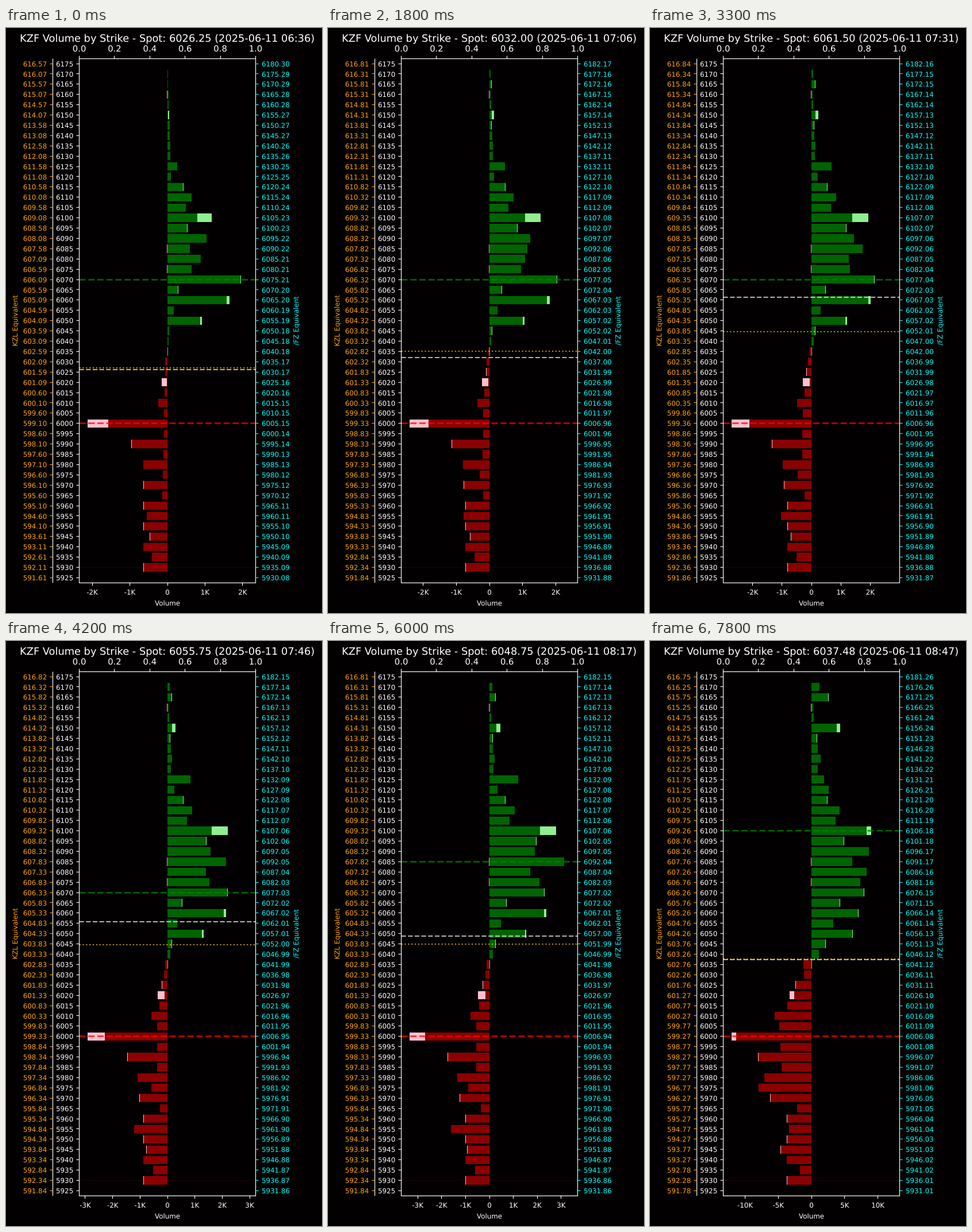
An HTML page that plays this animation: 550 by 1019 pixels, repeating every 8 s.

```html
<!DOCTYPE html>
<html lang="en">
<head>
<meta charset="utf-8">
<title>Volume by Strike</title>
<style>
  html, body { margin: 0; width: 550px; height: 1019px; overflow: hidden; background: #030001; }
  svg { display: block; font: 11.85px "DejaVu Sans", sans-serif; text-rendering: geometricPrecision; }
</style>
</head>
<body>
<svg id="chart" width="550" height="1019" viewBox="0 0 550 1019"></svg>
<script>
const STEP_MS = 300, LOOP_MS = 8000, OPENING_STEP = 22, LAST_STEP = 26;
const LEFT = 127.6, WIDTH = 306.8, RIGHT = LEFT + WIDTH, ZERO = LEFT + WIDTH / 2;
const TOP = 53.5, BOTTOM = 966.5, LONGEST = 139.5;
const HIGH = 6175, LOW = 5925, GAP = 5, PITCH = 17.908;
const ORANGE = '#ffa500', CYAN = '#0ff', WHITE = '#fff';
const chart = document.getElementById('chart');

const mix = (a, b, k) => a + (b - a) * k;
const clamp = v => Math.min(1, Math.max(0, v));
const snap = v => Math.floor(v) + .5;
const rowY = price => 62 + (HIGH - price) / GAP * PITCH;
const noise = n => { const v = Math.sin(n * 12.9898) * 43758.5453; return v - Math.floor(v); };

// Piecewise linear curve through [x, y] points, flat beyond both ends.
function curve(...points) {
  points.sort((a, b) => a[0] - b[0]);
  return x => {
    const i = points.findIndex(p => p[0] >= x);
    if (i < 1) return (i ? points[points.length - 1] : points[0])[1];
    const [x1, y1] = points[i - 1], [x2, y2] = points[i];
    return mix(y1, y2, (x - x1) / (x2 - x1));
  };
}

// Strikes ending in 0 and in 5 follow separate curves, early and late in the session.
const early = {
  tens: curve([6170, 1], [6120, 6], [6100, 77], [6080, 58], [6070, 128], [6060, 108], [6050, 60], [6040, 2],
    [6010, -16], [6000, -LONGEST], [5990, -63], [5980, -42]),
  fives: curve([6165, 1], [6135, 5], [6115, 28], [6075, 42], [6065, 19], [6045, 3], [6025, -4], [5965, -9],
    [5955, -36], [5935, -27])
};
const late = {
  tens: curve([6170, 14], [6160, 3], [6150, 50], [6140, 11], [6130, 11], [6110, 49], [6100, 104], [6070, 92],
    [6050, 72], [6040, 13], [6010, -64], [6000, -LONGEST], [5990, -93], [5970, -72], [5960, -43]),
  fives: curve([6165, 30], [6155, 4], [6115, 28], [6075, 85], [6065, 50], [6045, 25], [6035, -14], [6005, -56],
    [5985, -52], [5975, -92], [5965, -25], [5945, -54], [5935, -20])
};
// Strikes that swell before the opening and fall back after it.
const surges = { 6125: 32, 6100: 30, 6095: 40, 6085: 80, 6075: 30, 6070: -20, 5955: -30 };
const tipShares = { 6150: .5, 6100: .33, 6060: .05, 6050: .05, 6020: .9, 6000: .26 };

const spotAt = curve([0, 6026.25], [3, 6027.75], [6, 6032], [11, 6061.5], [17, 6050], [20, 6048.75], [26, 6037.48]);
const markAt = curve([0, 6027], [3, 6026.9], [6, 6035.2], [11, 6044.5], [20, 6045], [26, 6037.5]);
const fundAt = curve([0, 616.571], [3, 616.6847], [6, 616.8086], [11, 616.8371], [17, 616.7931], [20, 616.8119],
  [26, 616.7461]);
const futureAt = curve([0, 6180.296], [3, 6181.081], [6, 6182.167], [11, 6182.1605], [17, 6182.139], [20, 6182.145],
  [26, 6181.261]);

const text = (x, y, str, anchor = 'middle', fill = WHITE, extra = '') =>
  `<text x="${x}" y="${y}" text-anchor="${anchor}" fill="${fill}" ${extra}>${str}</text>`;
const line = (x1, y1, x2, y2, stroke = WHITE, width = 1.2, extra = '') =>
  `<line x1="${x1}" y1="${y1}" x2="${x2}" y2="${y2}" stroke="${stroke}" stroke-width="${width}" ${extra}/>`;
const sideLabel = (x, str, fill) => text(0, 0, str, 'middle', fill, `transform="translate(${x} 510) rotate(-90)"`);

function barsAt(step) {
  const before = clamp(step / OPENING_STEP);
  const after = clamp((step - OPENING_STEP) / (LAST_STEP - OPENING_STEP));
  const progress = .38 * before + .62 * after;
  const surge = clamp(step / 20) * (1 - after);
  const bars = [];
  for (let strike = HIGH - GAP; strike > LOW; strike -= GAP) {
    const kind = strike % 10 ? 'fives' : 'tens';
    const length = mix(early[kind](strike), late[kind](strike), progress) + surge * (surges[strike] || 0);
    const share = (tipShares[strike] || 0) * (1 - .77 * progress);
    const sliver = noise(strike) < .35 && Math.abs(length) > 4 ? 1 : 0;
    bars.push({ strike, length, tip: Math.abs(length) * share || sliver });
  }
  const peak = 2.13 + 1.37 * before ** 1.2 + 8.57 * after;
  return { bars, peak };
}

function clock(step) {
  const minutes = 396 + step * 5 + (step >= 18 ? 1 : 0);
  const pad = n => String(n).padStart(2, '0');
  return pad(Math.floor(minutes / 60)) + ':' + pad(minutes % 60);
}

function drawBar({ strike, length, tip }) {
  const up = length > 0;
  const y = Math.round(rowY(strike) - PITCH * .4);
  const height = Math.round(rowY(strike) + PITCH * .4) - y;
  const span = (from, to, fill) =>
    `<rect x="${ZERO + Math.min(from, to)}" y="${y}" width="${Math.abs(to - from)}" height="${height}" fill="${fill}"/>`;
  const end = Math.round(length);
  const inner = end - Math.sign(length) * Math.min(Math.abs(end), Math.round(tip));
  return span(0, inner, up ? '#006400' : '#8b0000')
    + span(inner, end, up ? '#90ee90' : '#ffc0cb')
    + (noise(strike + .5) < .12 ? span(0, up ? -.8 : .8, up ? '#ffc0cb' : '#90ee90') : '');
}

function drawLevels(bars, spot, mark) {
  const level = (y, color, width, dash) => line(LEFT, y, RIGHT, y, color, width,
    `stroke-opacity=".7" stroke-dasharray="${dash.map(d => d * width)}"`);
  const dashed = [3.7, 1.6], dotted = [1, 1.65];
  const byLength = [...bars].sort((a, b) => a.length - b.length);
  const lowest = snap(rowY(byLength[0].strike)), highest = snap(rowY(byLength[byLength.length - 1].strike));
  const faint = snap(rowY(5930));
  return line(LEFT, faint, RIGHT, faint, '#8b0000', 1, 'stroke-opacity=".25"')
    + level(highest, '#008000', 2.96, dashed)
    + level(lowest, '#f00', 2.96, dashed)
    + level(Math.round(rowY(spot)), WHITE, 2.2, dashed)
    + level(Math.round(rowY(mark)), '#ffd700', 2.2, dotted);
}

function drawAxes(fund, future, peak) {
  const l = snap(LEFT), r = snap(RIGHT), outer = 81.5;
  let out = `<rect x="${l}" y="${TOP}" width="${r - l}" height="${BOTTOM - TOP}" fill="none" stroke="#fff" stroke-width="1.2"/>`
    + line(outer, TOP, outer, BOTTOM);
  for (let strike = HIGH; strike >= LOW; strike -= GAP) {
    const y = snap(rowY(strike)), base = Math.round(rowY(strike) + 4.6);
    out += line(l - 5, y, l, y) + text(LEFT - 10.4, base, strike, 'end')
      + line(outer - 5, y, outer, y, ORANGE)
      + text(71.2, base, (strike * fund / HIGH).toFixed(2), 'end', ORANGE)
      + line(r, y, r + 5, y, CYAN)
      + text(RIGHT + 10.5, base, (strike * future / HIGH).toFixed(2), 'start', CYAN);
  }
  for (let i = 0; i <= 5; i++) {
    const x = LEFT + WIDTH * i / 5;
    out += line(snap(x), TOP - 5, snap(x), TOP) + text(x, 41, (i / 5).toFixed(1), 'middle', WHITE, 'font-size="14.8"');
  }
  const limit = peak * 1.1;
  const size = [1, 2, 2.5, 5].find(s => 2 * limit / s <= 8) || 5;
  for (let n = -Math.floor(limit / size); n * size <= limit; n++) {
    const x = ZERO + n * size * LONGEST / peak;
    out += line(snap(x), BOTTOM, snap(x), BOTTOM + 5) + text(x, 987, n ? n * size + 'K' : '0');
  }
  return out;
}

function draw(step) {
  const { bars, peak } = barsAt(step);
  const spot = spotAt(step);
  const title = `KZF Volume by Strike - Spot: ${spot.toFixed(2)} (2025-06-11 ${clock(step)})`;
  chart.innerHTML = bars.map(drawBar).join('')
    + drawLevels(bars, spot, markAt(step))
    + drawAxes(fundAt(step), futureAt(step), peak)
    + text(280.7, 24, title, 'middle', WHITE, 'font-size="17.8"')
    + text(ZERO, 1006, 'Volume')
    + sideLabel(19.5, 'KZL Equivalent', ORANGE)
    + sideLabel(508.5, '/FZ Equivalent', CYAN);
}

let shown = -1;
const start = performance.now();
function tick() {
  const step = Math.floor((performance.now() - start) % LOOP_MS / STEP_MS);
  if (step !== shown) draw(shown = step);
  requestAnimationFrame(tick);
}
tick();
</script>
</body>
</html>
```
